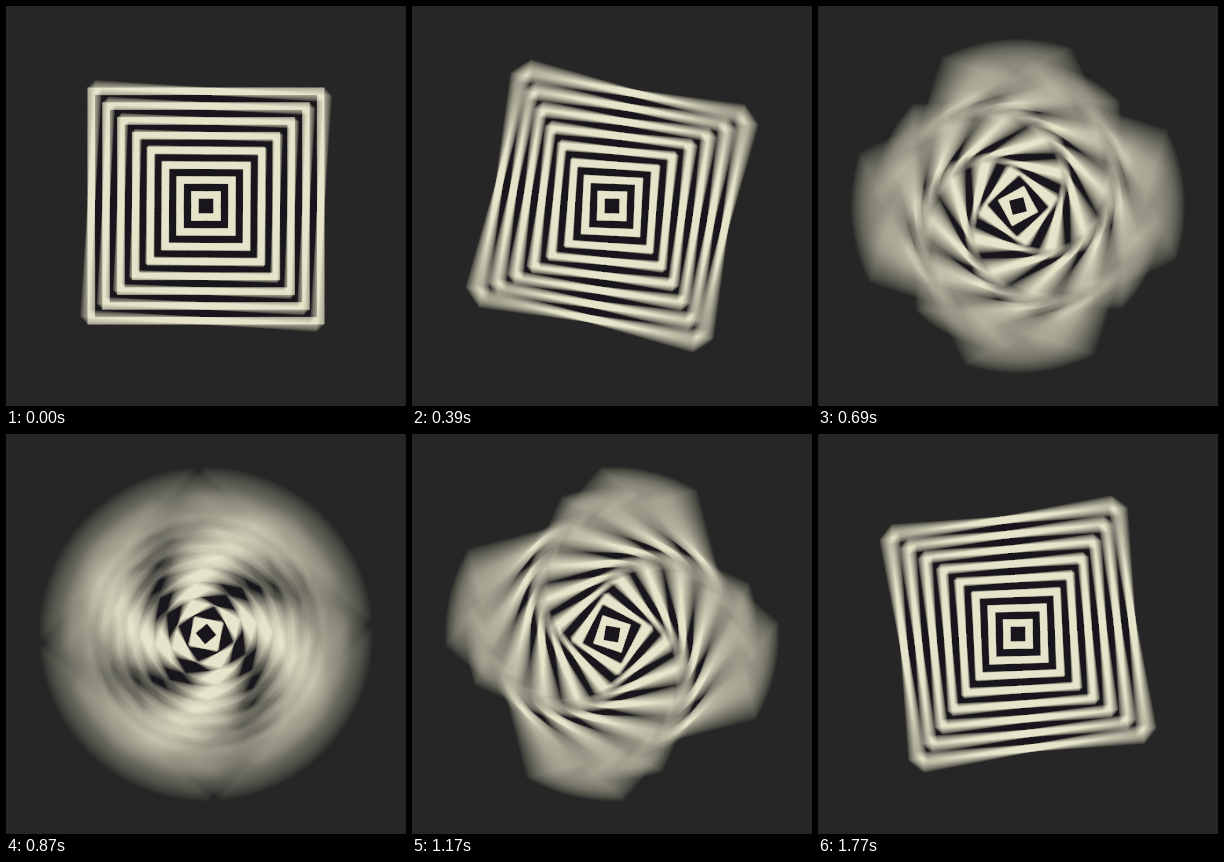
Write an HTML page with a canvas that moves like this. It is 400x400 px and loops after 1800 ms.

```html
<!DOCTYPE html>
<html lang="en">
<head>
<meta charset="utf-8">
<title>Twisting squares</title>
<style>
html, body { margin: 0; width: 100%; height: 100%; overflow: hidden; background: #262626; }
canvas { display: block; }
</style>
</head>
<body>
<canvas id="stage" width="400" height="400"></canvas>
<script>
const SIZE = 400, FRAMES = 60, FRAME_MS = 30;
const SQUARES = 16, STEP = 7.4, QUARTER = Math.PI / 2;
const BACK = [38, 38, 38], DARK = [24, 22, 28], CREAM = [230, 228, 202];
const EASE_X = 2 / 3, EASE_Y = -2 / 9;
const FINE = 8; // radius table entries per pixel

const ctx = document.getElementById('stage').getContext('2d');
const clamp = (v, lo, hi) => v < lo ? lo : v > hi ? hi : v;

// Symmetric cubic ease that swings back before and past the end after
const bezier = (p, c) => 3 * p * (1 - p) ** 2 * c + 3 * p * p * (1 - p) * (1 - c) + p ** 3;
function ease(x) {
  let lo = 0, hi = 1;
  for (let n = 0; n < 40; n++) {
    const mid = (lo + hi) / 2;
    if (bezier(mid, EASE_X) < x) lo = mid; else hi = mid;
  }
  return bezier(lo, EASE_Y);
}

// Half the angle by which a circle of radius r leaves each side of a square
const gaps = Array.from({ length: SQUARES + 1 }, (_, i) =>
  Float32Array.from({ length: 300 * FINE }, (_, n) => {
    const h = i * STEP, r = n / FINE;
    return r <= h ? 0 : Math.min(Math.acos(h / r), QUARTER / 2);
  }));

// Angle spent outside the square, summed from 0 to angle
function outside(angle, gap) {
  const n = Math.floor(angle / QUARTER + 0.5);
  return 2 * n * gap + clamp(angle - n * QUARTER, -gap, gap);
}

// Share of a sweep that the square covers a point, softened over a pixel
function coverage(i, r, phi, spans) {
  const base = Math.round(r * FINE), soft = 0.5 / r;
  let out = 0;
  for (const [from, to] of spans) {
    let lo = phi - i * from, hi = phi - i * to;
    if (lo > hi) [lo, hi] = [hi, lo];
    if (hi - lo < 2 * soft) {
      const mid = (lo + hi) / 2;
      lo = mid - soft;
      hi = mid + soft;
    }
    for (let d = -3; d <= 3; d += 3) {
      const gap = gaps[i][Math.max(0, base + d)];
      out += (outside(hi, gap) - outside(lo, gap)) / (hi - lo);
    }
  }
  return 1 - out / (3 * spans.length);
}

function render(frame) {
  const image = ctx.createImageData(SIZE, SIZE), data = image.data;
  const turn = t => -QUARTER * ease(t / FRAMES);
  const start = turn(0);
  // The shutter is open for one frame; before the start everything rests
  const spans = frame
    ? [[turn(frame - 0.5), turn(frame + 0.5)]]
    : [[start, start], [start, turn(0.5)]];

  for (let y = 0, at = 0; y < SIZE; y++) {
    for (let x = 0; x < SIZE; x++, at += 4) {
      const dx = x + 0.5 - SIZE / 2, dy = y + 0.5 - SIZE / 2;
      const r = Math.hypot(dx, dy), phi = Math.atan2(dy, dx);
      let back = 1, cream = 0;
      for (let i = SQUARES; i > 0; i--) {
        const h = i * STEP;
        if (r > h * Math.SQRT2 + 1) break;
        const k = r < h - 1 ? 1 : coverage(i, r, phi, spans);
        back *= 1 - k;
        cream = cream * (1 - k) + (i % 2 ? 0 : k);
      }
      // Mix light rather than stored values
      for (let c = 0; c < 3; c++) {
        data[at + c] = Math.sqrt(back * BACK[c] ** 2 + cream * CREAM[c] ** 2
          + Math.max(0, 1 - back - cream) * DARK[c] ** 2);
      }
      data[at + 3] = 255;
    }
  }
  return image;
}

const cache = [];
const began = performance.now();
let shown = -1;
function draw() {
  const frame = Math.floor((performance.now() - began) / FRAME_MS) % FRAMES;
  if (frame !== shown) {
    ctx.putImageData(cache[frame] ||= render(frame), 0, 0);
    shown = frame;
  }
  requestAnimationFrame(draw);
}
draw();
</script>
</body>
</html>
```
